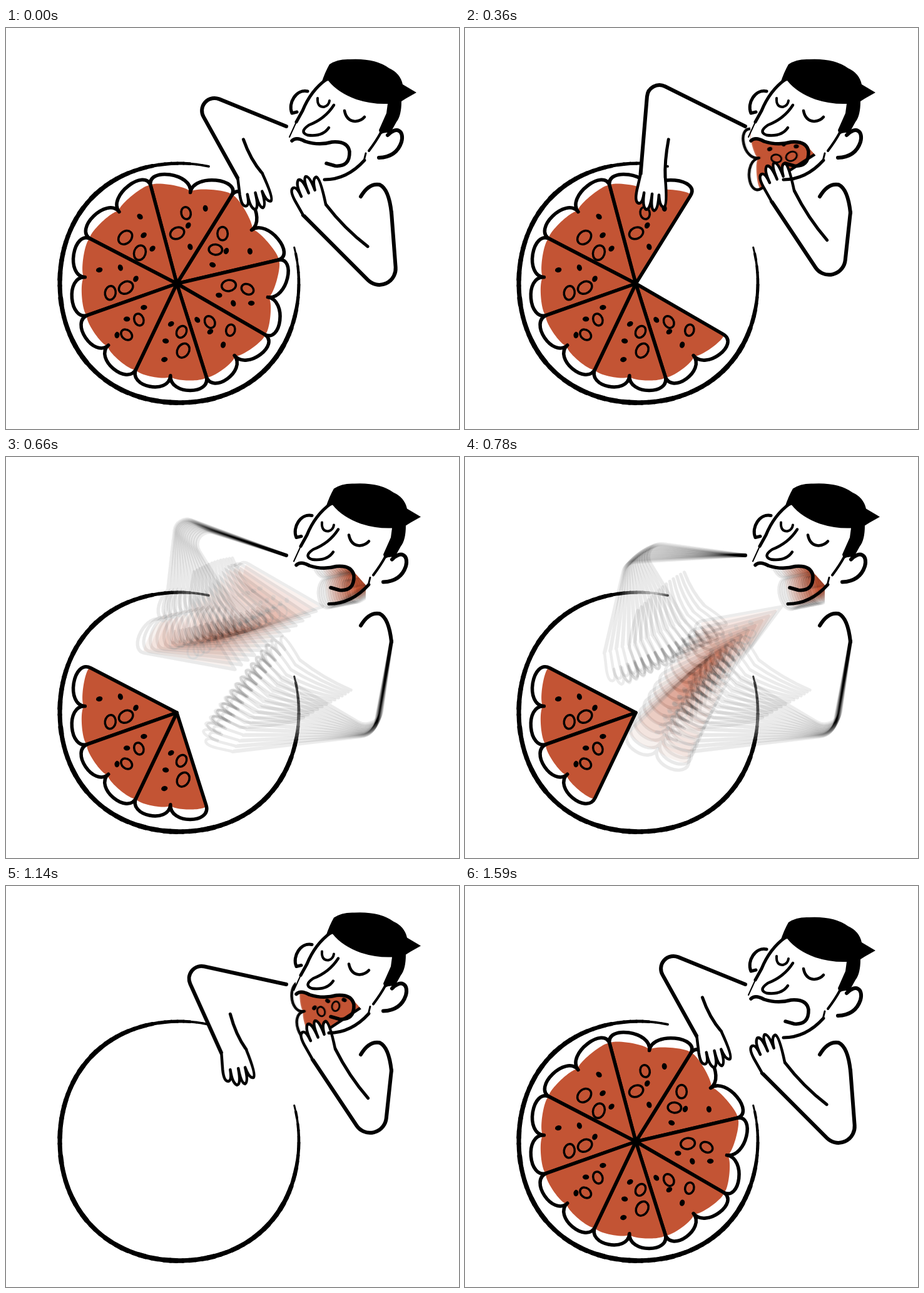
These frames come from a looping animation (724 px wide and 640 px high, 1.62 s). An HTML page with a canvas:

```html
<!DOCTYPE html>
<html lang="en">
<head>
<meta charset="utf-8">
<title>Pizza eater</title>
<style>
html, body { margin: 0; width: 100%; height: 100%; overflow: hidden; background: #fff; }
canvas { display: block; }
</style>
</head>
<body>
<canvas id="stage" width="724" height="640"></canvas>
<script>
const W = 724, H = 640, STEP = 30, STEPS = 54, EXPOSURES = 14, BEAT = 120;
const view = document.getElementById('stage').getContext('2d');
const buffer = document.createElement('canvas');
buffer.width = W;
buffer.height = H;
const g = buffer.getContext('2d');
g.lineCap = g.lineJoin = 'round';

const clamp = u => Math.max(0, Math.min(1, u));
const mix = (a, b, u) => a + (b - a) * u;
const ease = u => u * u * (3 - 2 * u);
// Eased travel with a short rest at both ends
const travel = (t, from, to) => ease(clamp((t - from - 15) / (to - from - 30)));
const polar = ([x, y], angle, r) => [x + r * Math.cos(angle), y + r * Math.sin(angle)];
const random = n => {
  const v = Math.sin(n * 12.9898) * 43758.5453;
  return v - Math.floor(v);
};

function stroke(path, width, color = '#000') {
  g.lineWidth = width;
  g.strokeStyle = color;
  g.stroke(path);
}

function fill(path, color) {
  g.fillStyle = color;
  g.fill(path);
}

// ---- Pizza ----
const CENTER = [273, 408], MOUTH = [585, 185], IN_MOUTH_ANGLE = 2.95;
const EATING_ORDER = [1, 2, 0, 3, 7, 4, 6, 5];

// Slightly uneven cuts, clockwise from the top left
function cut(i) {
  const lean = Math.cos((i - 1.5) * Math.PI / 4);
  return { angle: -1.855 + i * Math.PI / 4 + 0.06 * lean, radius: 158 + 8 * lean };
}

function sliceShape(rim, push) {
  const outward = ([angle, r]) => polar(CENTER, angle, r + push);
  const p = new Path2D();
  p.moveTo(...CENTER);
  p.lineTo(...polar(CENTER, ...rim[0]));
  for (let i = 0; i < 2; i++)
    p.bezierCurveTo(...outward(rim[i]), ...outward(rim[i + 1]), ...polar(CENTER, ...rim[i + 1]));
  p.closePath();
  return p;
}

function sliceToppings(index, from, to) {
  return Array.from({ length: 5 }, (_, j) => {
    const seed = index * 17 + j * 3 + 1;
    const across = (j % 2 ? 0.36 : 0.64) + (random(seed) - 0.5) * 0.25;
    const spot = polar(CENTER, mix(from, to, across), 62 + 15 * j + 8 * random(seed + 1));
    const ring = j % 2 === 1, size = ring ? 7 + 3 * random(seed + 2) : 4;
    const path = new Path2D();
    path.ellipse(...spot, size, size * 1.3, 3 * random(seed), 0, 7);
    return { path, ring };
  });
}

const slices = EATING_ORDER.map((index, turn) => {
  const a = cut(index), b = cut((index + 1) % 8);
  if (b.angle < a.angle) b.angle += 2 * Math.PI;
  const middle = (a.angle + b.angle) / 2;
  const rim = [[a.angle, a.radius], [middle, 147], [b.angle, b.radius]];
  return {
    outline: sliceShape(rim, 32),
    sauce: sliceShape(rim, 10),
    toppings: sliceToppings(index, a.angle, b.angle),
    angle: (middle + 2 * Math.PI) % (2 * Math.PI),
    notch: polar(CENTER, middle, 147),
    grab: BEAT * (turn + 1),
    // The last bite is held a little longer
    release: turn === 7 ? 185 : 125
  };
});

function drawSlice(s) {
  fill(s.outline, '#fff');
  fill(s.sauce, '#c35434');
  stroke(s.outline, 5.5);
  for (const { path, ring } of s.toppings) ring ? stroke(path, 3.5) : fill(path, '#000');
}

// Everything outside the face: below the lip and left of the cheek
const outsideFace = new Path2D('M0 0H448L457 180Q464 173 478 181Q500 188 521 182Q546 180 551 193L568 212V640H0Z');

function drawHeldSlice(s, age) {
  const u = travel(age, 0, BEAT), swallowed = ease(clamp((age - s.release) / 125));
  if (swallowed === 1) return;
  const size = mix(1, 0.8, u), angle = mix(s.angle, IN_MOUTH_ANGLE, u);
  const tip = polar([mix(CENTER[0], MOUTH[0], u), mix(CENTER[1], MOUTH[1], u)], angle, -150 * swallowed);
  g.save();
  g.clip(outsideFace);
  g.translate(...tip);
  g.rotate(angle - s.angle);
  g.scale(size, size);
  g.translate(-CENTER[0], -CENTER[1]);
  drawSlice(s);
  g.restore();
}

// ---- Plate: an open brush ring, thin at both ends ----
const plate = Array.from({ length: 100 }, (_, i) => {
  const at = k => {
    const a = mix(-0.3, 4.96, k / 100);
    return polar([277, 407], a, 193 - 2 * Math.cos(4 * a));
  };
  const path = new Path2D();
  path.moveTo(...at(i));
  path.lineTo(...at(i + 1));
  return [path, 3 + 4 * Math.min(1, i / 16, (100 - i) / 16) + random(i)];
});

// ---- Head ----
const hair = new Path2D('M504 88Q510 70 517 58Q530 49 550 50Q590 48 612 64Q630 72 634 90L656 103L640 112' +
  'L632 117Q632 140 624 150L614 168Q606 165 598 170L596 163L608 136L610 121Q585 122 560 114Q530 103 515 84Z');
const headLines = [
  ['M512 82Q487 100 474 132L464 150', 5],
  ['M464 150L453 174', 2],
  ['M482 101C464 97 450 120 457 136L465 134', 5],
  ['M599 167Q592 180 580 196', 4],
  ['M610 171C624 156 637 164 632 182Q624 206 596 207', 6],
  ['M498 112Q497 126 508 126Q516 124 517 116', 4],
  ['M524 123Q510 145 484 155Q468 166 482 171Q506 174 516 159', 4.5],
  ['M541 132Q544 148 558 149Q568 148 573 142', 4.5],
  ['M457 180Q464 173 478 181Q500 188 521 182Q546 180 549 197Q550 222 526 220L512 216', 5.5],
  ['M509 242Q545 242 573 211', 5],
  ['M572 212L575 200', 3]
].map(([d, width]) => [new Path2D(d), width]);

function drawHead() {
  fill(hair, '#000');
  for (const [path, width] of headLines) stroke(path, width);
}

// ---- Arms ----
const hand = new Path2D('M-20 0L-22 26Q-23 45 -16 46Q-10 46 -10 28Q-10 50 -3 54Q4 54 3 28' +
  'Q4 52 10 54Q16 52 14 28Q18 47 25 46Q30 42 20 0');

// Pose: wrist x, wrist y, hand angle, elbow x, elbow y
const left = {
  side: 1, shoulder: new Path2D(), start: [448, 157], inner: 62, radius: 20,
  rest: [390, 236, -0.2, 288, 92], mouth: [445, 215, -1.1, 285, 112],
  reach: [10, -55], grip: 0.15,
  elbow: (x, y) => [296 - (x - 340) ** 2 / 600, 80 + (y - 240) ** 2 / 100],
  leave: [364, 264, -0.15, 278, 120]
};
const right = {
  side: -1, shoulder: new Path2D('M567 269Q580 247 597 250Q612 257 616 295'), start: [616, 294], inner: 95, radius: 26,
  rest: [493, 290, 2.7, 628, 452], mouth: [508, 268, 2.7, 600, 442],
  reach: [50, -5], grip: 1.55,
  elbow: (x, y) => [640 - (x - 493) ** 2 / 550, 444],
  leave: [508, 268, 2.7, 600, 442]
};

function grabPose(arm, { notch }) {
  const [x, y] = notch.map((v, i) => mix(v, CENTER[i], 0.2) + arm.reach[i]);
  return [x, y, arm.grip, ...arm.elbow(x, y)];
}

// The hands take turns; each grabs on one beat and feeds on the next
[left, right].forEach((arm, turn) => {
  arm.keys = [[turn * BEAT, arm.rest]];
  slices.filter((_, i) => [1, 0][turn] === 1 - i % 2 || false).forEach(() => {});
  for (let i = turn; i < slices.length; i += 2) {
    const { grab } = slices[i];
    arm.keys.push([grab, grabPose(arm, slices[i])], [grab + BEAT, arm.mouth]);
  }
  arm.keys.push([1128, arm.leave], [1275, arm.rest]);
});

function poseAt(keys, t) {
  const next = keys.findIndex(key => key[0] > t);
  if (next < 1) return keys.at(next)[1];
  const [from, a] = keys[next - 1], [to, b] = keys[next];
  const u = travel(t, from, to);
  return a.map((v, i) => mix(v, b[i], u));
}

function drawArm({ side, shoulder, start, inner, radius, keys }, t) {
  const [x, y, angle, ex, ey] = poseAt(keys, t);
  const [ix, iy] = polar([x, y], angle, 20 * side), [ox, oy] = polar([x, y], angle, -20 * side);
  const [endX, endY] = polar([ix, iy], Math.atan2(ey - oy, ex - ox), inner);

  const outer = new Path2D();
  outer.moveTo(...start);
  outer.arcTo(ex, ey, ox, oy, radius);
  outer.lineTo(ox, oy);
  const body = new Path2D(outer);
  body.lineTo(ix, iy);
  body.lineTo(endX, endY);
  const innerLine = new Path2D();
  innerLine.moveTo(ix, iy);
  innerLine.quadraticCurveTo((ix + endX) / 2 - 4, (iy + endY) / 2 + 5, endX, endY);

  fill(body, '#fff');
  stroke(shoulder, 6);
  stroke(outer, 6);
  stroke(innerLine, 5);
  g.save();
  g.translate(x, y);
  g.rotate(angle);
  g.scale(side, 1);
  fill(hand, '#fff');
  stroke(hand, 4.5);
  g.restore();
}

// ---- Scene ----
function drawScene(t, raised) {
  const nod = raised ? [7, -7.5] : [0, 0];
  g.fillStyle = '#fff';
  g.fillRect(0, 0, W, H);
  for (const [path, width] of plate) stroke(path, width);

  const refill = ease(clamp((t - 1200) / 360));
  for (const s of slices) {
    g.globalAlpha = t < s.grab ? 1 : refill;
    if (g.globalAlpha) drawSlice(s);
  }
  g.globalAlpha = 1;

  const withNod = draw => {
    g.save();
    g.translate(...nod);
    draw();
    g.restore();
  };
  withNod(() => {
    for (const s of slices) if (t >= s.grab) drawHeldSlice(s, t - s.grab);
  });
  drawArm(left, t);
  drawArm(right, t);
  withNod(drawHead);
}

let shown = -1;

function render(now) {
  const step = Math.floor(now / STEP) % STEPS;
  if (step === shown) return;
  shown = step;
  const raised = step < 44 && step % 4 > 1;
  // Motion blur: the average of several exposures
  for (let i = 0; i < EXPOSURES; i++) {
    drawScene(step * STEP + (i - (EXPOSURES - 1) / 2) * STEP / EXPOSURES, raised);
    view.globalAlpha = 1 / (i + 1);
    view.drawImage(buffer, 0, 0);
  }
}

const begin = performance.now();
function loop() {
  render(performance.now() - begin);
  requestAnimationFrame(loop);
}
loop();
</script>
</body>
</html>
```
